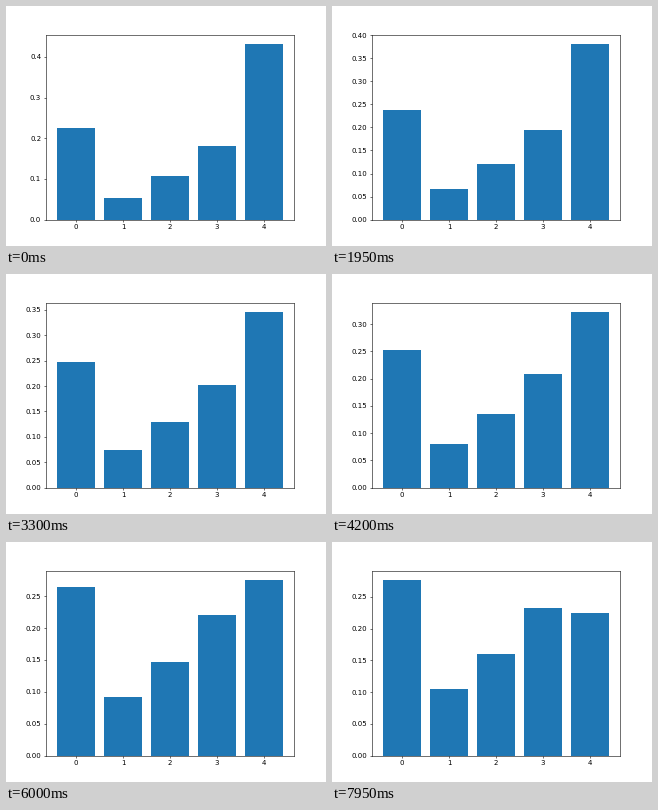
Recreate the animation shown at these times as a matplotlib script. Size 320 px wide and 240 px high, loop 8 s.

```python
import numpy as np
import matplotlib.pyplot as plt
from matplotlib.animation import FuncAnimation

LOOP_MS = 8000
TICK_MS = 50
STEP_MS = 150

START = np.array([0.2252, 0.0533, 0.1075, 0.1812, 0.4328])
RATE = 0.00098 * np.array([1, 1, 1, 1, -4])  # per step; the total stays at 1

fig, ax = plt.subplots(figsize=(6.4, 4.8), dpi=50)
bars = ax.bar(range(len(START)), START)


def update(frame):
    step = frame * TICK_MS // STEP_MS
    heights = START + step * RATE
    for bar, height in zip(bars, heights):
        bar.set_height(height)
    ax.set_ylim(0, 1.05 * heights.max())
    return bars


animation = FuncAnimation(fig, update, frames=LOOP_MS // TICK_MS,
                          interval=TICK_MS, repeat=True, repeat_delay=0)
plt.show()
```
